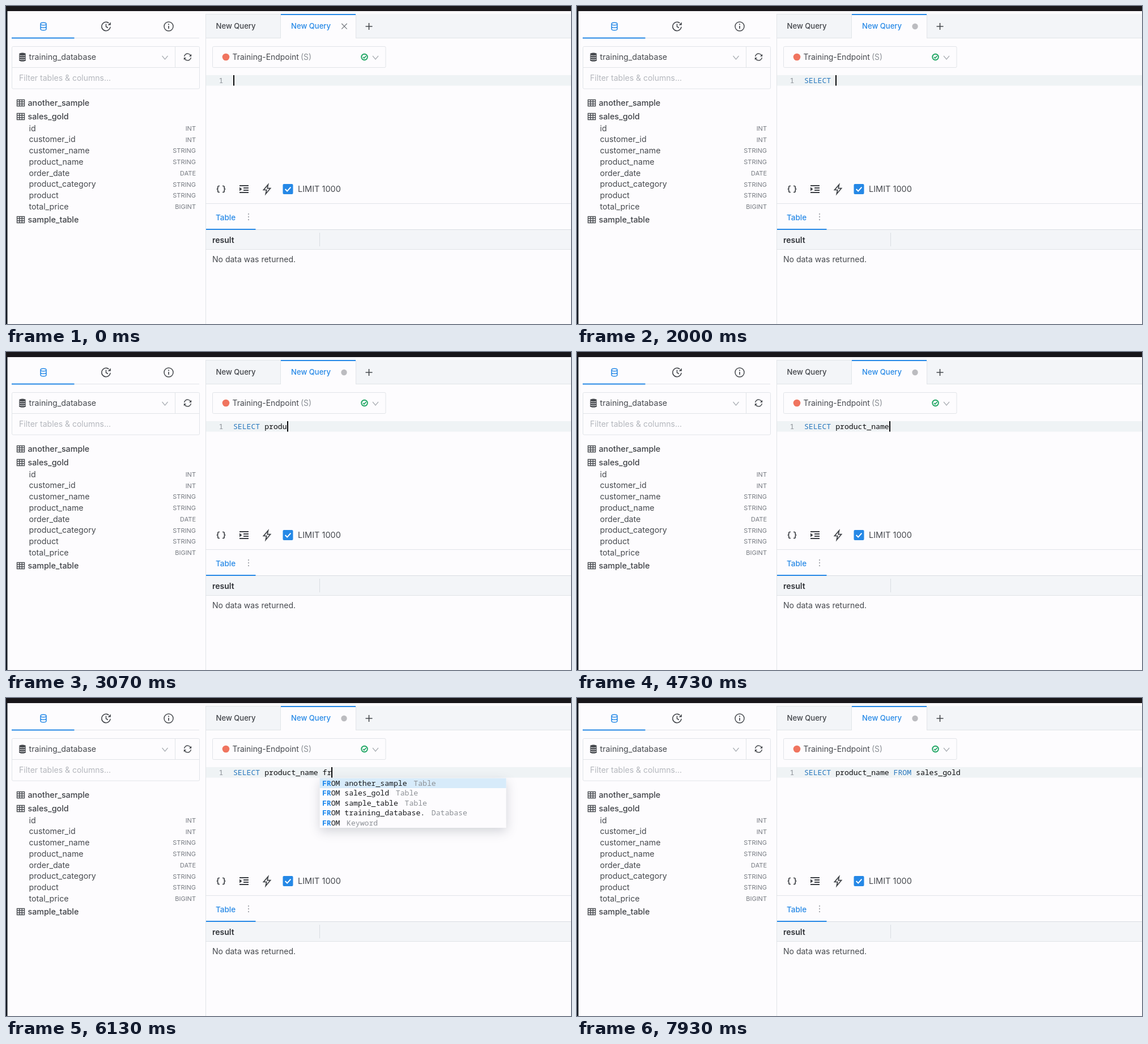
These frames come from a looping animation (997x561 px, 8 s). An HTML page with a canvas:

```html
<!DOCTYPE html>
<html lang="en">
<head>
<meta charset="utf-8">
<title>Query editor</title>
<style>
html, body { margin: 0; width: 100%; height: 100%; overflow: hidden; background: #fdfcfe; }
canvas { display: block; width: 997px; height: 561px; }
</style>
</head>
<body>
<canvas id="stage"></canvas>
<script>
const W = 997, H = 561, LOOP = 8000;
const canvas = document.getElementById('stage');
const ctx = canvas.getContext('2d');
const dpr = window.devicePixelRatio || 1;
canvas.width = W * dpr;
canvas.height = H * dpr;

const UI = 'Inter, "Liberation Sans", sans-serif';
const MONO = '"Noto Sans Mono", "DejaVu Sans Mono", monospace';
const CODE_SIZE = 13.13, CHAR = 7.88, CODE_X = 401, ROW = 17.5;
const PAPER = '#fdfcfe', PANEL = '#f3f5f8', LINE = '#e1e4e8', INK = '#46494e', BLUE = '#2588e6';

// Each edit: time in ms, editor content from then on.
const edits = [
  [0, ''], [530, 's'], [670, 'se'], [800, 'sel'], [1330, 'SELECT'], [1730, 'SELECT ']
];
[2400, 2530, 2800, 2930, 3070, 3200, 3330, 3600, 3800, 3930, 4070, 4270].forEach((t, i) =>
  edits.push([t, 'SELECT ' + 'product_name'.slice(0, i + 1)]));
const column = 'SELECT product_name';
edits.push([4800, column + ' '], [5000, column + ' f'], [5130, column + ' fr'],
  [6420, column + ' FROM sales_gold']);
const ARROW_DOWN = 6210;

const udf = name => [name + '()', 'UDF'];
const hints = {
  s: [['SELECT', 'Keyword']],
  p: ['percent_rank', 'percentile', 'approx_count_distinct', 'approx_percentile',
    'percentile_approx', 'map_from_entries', 'date_part', 'map_entries'].map(udf),
  f: [['FROM another_sample', 'Table'], ['FROM sales_gold', 'Table'], ['FROM sample_table', 'Table'],
    ['FROM training_database.', 'Database'], ['FROM', 'Keyword']]
};

function rect(x, y, w, h, color) {
  ctx.fillStyle = color;
  ctx.fillRect(x, y, w, h);
}

function text(s, x, y, color = INK, size = 14.2, weight = 400, align = 'left', family = UI) {
  ctx.font = `${weight} ${size}px ${family}`;
  ctx.textAlign = align;
  ctx.fillStyle = color;
  ctx.fillText(s, x, y);
}

function code(s, x, y, color, weight = 400) {
  text(s, x, y, color, CODE_SIZE, weight, 'left', MONO);
}

function stroke(d, color = INK, width = 1.5) {
  ctx.strokeStyle = color;
  ctx.lineWidth = width;
  ctx.stroke(new Path2D(d));
}

function fill(d, color) {
  ctx.fillStyle = color;
  ctx.fill(new Path2D(d));
}

function frame(x, y, w, h) {
  ctx.strokeStyle = LINE;
  ctx.lineWidth = 1;
  ctx.beginPath();
  ctx.roundRect(x, y, w, h, 2);
  ctx.stroke();
}

function disc(x, y, r, color) {
  ctx.fillStyle = color;
  ctx.beginPath();
  ctx.arc(x, y, r, 0, 7);
  ctx.fill();
}

function ring(x, y, r, color, width = 1.5, from = 0, to = Math.PI * 2) {
  ctx.strokeStyle = color;
  ctx.lineWidth = width;
  ctx.beginPath();
  ctx.arc(x, y, r, from, to);
  ctx.stroke();
}

function chevron(x, y) {
  stroke(`M${x - 5} ${y - 3}l5 6 5-6`, '#a9adb3', 1.2);
}

function tableIcon(y) {
  stroke(`M19.5 ${y - 5.5}h13v11h-13zM19.5 ${y - 2}h13M19.5 ${y + 1.8}h13M23.8 ${y - 5.5}v11M28.2 ${y - 5.5}v11`, '#4a4d52', 1.4);
}

function sidebar() {
  stroke('M61 31.5c0-3 10-3 10 0v9c0 3-10 3-10 0zM61 31.5c0 3 10 3 10 0M61 36c0 3 10 3 10 0', BLUE, 1.5);
  ring(176.5, 36, 7.7, INK, 1.6, 0.1, 5.4);
  stroke('M176.5 31.5v5l3.5 2', INK, 1.5);
  fill('M184.8 28.6v5.2h-5.2z', INK);
  ring(287, 36, 8, INK, 1.5);
  stroke('M287 35v5', INK, 1.7);
  disc(287, 32.3, 1.1, INK);
  rect(10, 56, 331, 1, LINE);
  rect(10, 55.5, 110.5, 2, BLUE);

  frame(10.5, 71.5, 331, 74.5);
  rect(10.5, 108, 331, 1, LINE);
  rect(298, 71.5, 1, 37, LINE);
  ctx.fillStyle = '#44474c';
  ctx.beginPath();
  ctx.ellipse(29, 85, 6, 2.4, 0, 0, 7);
  ctx.fill();
  [86.2, 89.7, 93.2].forEach(y =>
    fill(`M23 ${y}c1 2.7 11 2.7 12 0v2.6c-1 2.7-11 2.7-12 0z`, '#44474c'));
  text('training_database', 40.5, 95);
  chevron(280.5, 91);
  ring(320.5, 90, 6, INK, 1.4, 3.3, 5.8);
  ring(320.5, 90, 6, INK, 1.4, 0.15, 2.65);
  fill('M327.2 84.8v4.2h-4.2z', INK);
  fill('M313.8 95.2v-4.2h4.2z', INK);
  text('Filter tables & columns...', 23, 132, '#b4b7bd', 14);

  [['another_sample', 171], ['sales_gold', 195], ['sample_table', 377]].forEach(([name, y]) => {
    tableIcon(y);
    text(name, 38.5, y + 5, '#404348', 14.3, 500);
  });
  const fields = ['id INT', 'customer_id INT', 'customer_name STRING', 'product_name STRING',
    'order_date DATE', 'product_category STRING', 'product STRING', 'total_price BIGINT'];
  fields.forEach((field, i) => {
    const [name, type] = field.split(' '), y = 216 + i * 19.72;
    text(name, 40.5, y + 4.7);
    text(type, 335, y + 4, '#777b82', 11, 400, 'right');
  });
}

function tabs(dirty) {
  rect(353, 14, 644, 43, PANEL);
  rect(353, 14, 132, 1, LINE);
  rect(353, 56, 644, 1, LINE);
  rect(484, 15, 134, 42, LINE);
  rect(485, 15, 132, 42, PAPER);
  rect(485, 14, 132, 2, BLUE);
  text('New Query', 370.5, 40, '#404348', 13.1, 500);
  text('New Query', 503, 40, BLUE, 13.1, 500);
  if (dirty) disc(596.5, 36, 5.2, '#bcbcc0');
  else stroke('M592.3 31l9.4 9.6M601.7 31l-9.4 9.6', '#73777d', 1.2);
  stroke('M634.5 36h12M640.5 30v12', INK, 1.6);
}

function endpoint() {
  frame(364.5, 71.5, 305.5, 37);
  disc(388, 90, 6.3, '#f0745f');
  text('Training-Endpoint', 399.5, 95, INK, 13.9);
  text('(S)', 520, 95, '#8c9096', 13.9);
  ring(632.5, 90, 5.3, '#20a664', 1.9);
  stroke('M629.9 90l2 2.1 3.4-4', '#20a664', 1.7);
  chevron(652, 91);
}

function toolbar() {
  const dark = '#3e4146';
  stroke('M377 317.5h-1.2q-2 0-2 2v1.6q0 1.9-2 1.9 2 0 2 1.9v1.6q0 2 2 2h1.2M382 317.5h1.2q2 0 2 2v1.6q0 1.9 2 1.9-2 0-2 1.9v1.6q0 2-2 2h-1.2', dark, 1.7);
  stroke('M412 317h16M419 321h9M419 325h9M412 329h16', dark, 1.8);
  fill('M412 319.5l4.5 3.5-4.5 3.5z', dark);
  stroke('M462.5 315l-8 9.5h5.2l-1.4 7 8.2-9.8h-5.3z', dark, 1.7);
  ctx.fillStyle = BLUE;
  ctx.beginPath();
  ctx.roundRect(488.5, 314, 18, 18, 2);
  ctx.fill();
  stroke('M492.7 323l3.5 3.6 6.2-7', '#fff', 2);
  text('LIMIT 1000', 515, 328, INK, 14.5);
}

function results() {
  rect(353, 348, 644, 1, LINE);
  text('Table', 370, 377.5, BLUE, 13.5, 500);
  [367, 372, 377].forEach(y => disc(428, y, 1, '#8a8e94'));
  rect(353, 394.5, 644, 35, PANEL);
  rect(353, 394, 644, 1, '#d9dde2');
  rect(353, 429, 644, 1, LINE);
  rect(353, 393, 87.5, 2, BLUE);
  rect(553, 400, 1, 24, '#d9dde2');
  text('result', 364, 418, '#303338', 14, 600);
  text('No data was returned.', 364, 452, INK, 14);
}

// Indexes of the matched letters: a solid run if there is one, else in order.
function match(label, word) {
  const s = label.toLowerCase(), run = s.indexOf(word);
  if (run >= 0) return [...word].map((_, i) => run + i);
  let at = -1;
  const hits = [];
  for (const c of word) {
    at = s.indexOf(c, at + 1);
    if (at < 0) return null;
    hits.push(at);
  }
  return hits;
}

function popup(word, wordX, selected) {
  const rows = (hints[word[0]] || [])
    .map(([label, kind]) => ({ label, kind, hits: match(label, word) }))
    .filter(row => row.hits);
  if (!rows.length) return;
  const x = wordX - 5, y = 141.5, w = 329;
  ctx.save();
  ctx.shadowColor = 'rgba(60,70,85,.22)';
  ctx.shadowBlur = 18 * dpr;
  ctx.shadowOffsetY = 6 * dpr;
  rect(x, y, w, rows.length * ROW, PAPER);
  ctx.restore();
  rows.forEach(({ label, kind, hits }, i) => {
    const top = y + i * ROW, base = top + 13.3, left = wordX - 0.7;
    if (i === selected) rect(x, top, w, ROW, '#d7ebfa');
    [...label].forEach((c, k) => {
      const hit = hits.includes(k);
      code(c, left + k * CHAR, base, hit ? '#1b87ec' : '#17191c', hit ? 700 : 400);
    });
    code(kind, left + label.length * CHAR + 11.7, base, '#8d9196');
  });
}

function editor(t) {
  const [since, content] = edits.filter(e => e[0] <= t).pop();
  rect(353, 122, 644, 18.5, '#eff3f5');
  code('1', 375.5, 136.3, '#8b9097');
  let x = CODE_X;
  content.split(/( )/).forEach(part => {
    code(part, x, 136.3, /^(SELECT|FROM)$/.test(part) ? '#2878be' : '#0c0d0f');
    x += part.length * CHAR;
  });
  const word = content.split(' ').pop();
  if (word) popup(word, x - word.length * CHAR, t >= ARROW_DOWN ? 1 : 0);
  if ((t - since) % 1000 < 500) rect(Math.round(x), 122, 2, 18.5, '#08090b');
}

function draw(t) {
  ctx.setTransform(dpr, 0, 0, dpr, 0, 0);
  rect(0, 0, W, H, PAPER);
  sidebar();
  tabs(t >= edits[1][0]);
  endpoint();
  toolbar();
  results();
  rect(352, 14, 1, H, LINE);
  editor(t);
  rect(0, 0, 2.5, H, '#121820');
  rect(0, 0, W, 9, '#18161a');
}

const start = performance.now();
function tick() {
  draw((performance.now() - start) % LOOP);
  requestAnimationFrame(tick);
}
tick();
</script>
</body>
</html>
```
